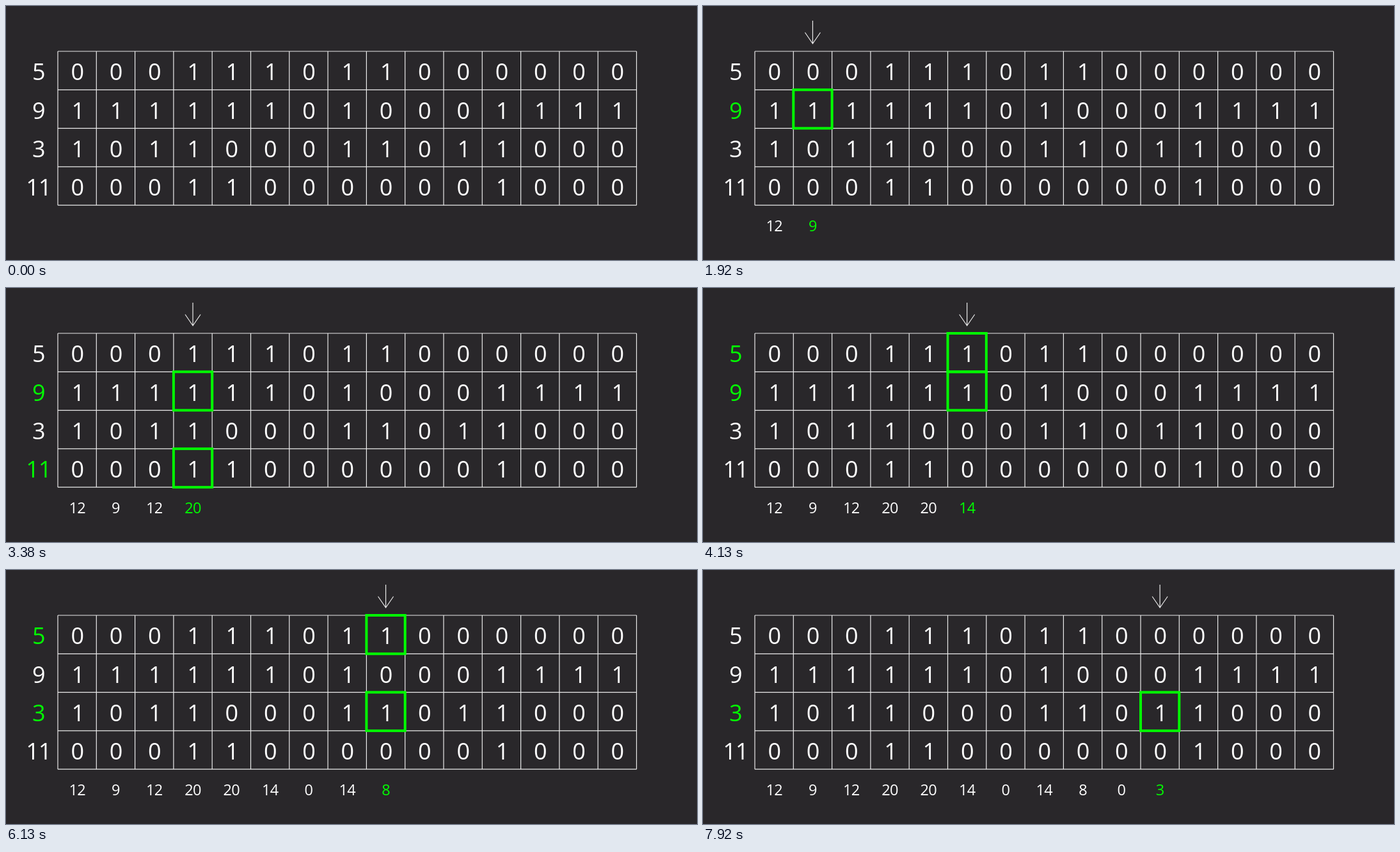
These frames come from a looping animation (1080 px wide and 398 px high, 8 s). An HTML page:

```html
<!DOCTYPE html>
<html lang="en">
<head>
<meta charset="utf-8">
<title>Column sums</title>
<style>
  html, body { margin: 0; width: 100%; height: 100%; overflow: hidden; background: #29272a; }
  svg { display: block; width: 100%; height: 100%; }
  text { font: 36px "Open Sans", "Noto Sans", sans-serif; letter-spacing: -.03em; text-anchor: middle; fill: #fff; }
  .sum { font-size: 23.5px; }
  .line { fill: none; stroke: #ececec; stroke-width: 1.2; }
  .box { fill: none; stroke: #0f0; stroke-width: 4; }
  text.on { fill: #0f0; }
  .off { display: none; }
</style>
</head>
<body>
<svg viewBox="0 0 1080 398"></svg>
<script>
const LOOP = 8000, START = 792, STEP = 2000 / 3;
const LEFT = 81, TOP = 71, CELL = 60.3, COLS = 15;
const weights = [5, 9, 3, 11];
const rows = ['000111011000000', '111111010001111', '101100011011000', '000110000001000'];

const svg = document.querySelector('svg');

function add(tag, attrs, text = '') {
  const el = document.createElementNS('http://www.w3.org/2000/svg', tag);
  for (const name in attrs) el.setAttribute(name, attrs[name]);
  el.textContent = text;
  return svg.appendChild(el);
}

const midX = col => LEFT + CELL * (col + .5);
const baseY = row => TOP + CELL * (row + .5) + 15.2;

// The two heaviest rows set in a column.
const picksAt = col => weights.map((w, r) => r)
  .filter(r => rows[r][col] === '1')
  .sort((a, b) => weights[b] - weights[a])
  .slice(0, 2);

let grid = '';
for (let c = 0; c <= COLS; c++) grid += `M${LEFT + c * CELL} ${TOP}v${CELL * rows.length}`;
for (let r = 0; r <= rows.length; r++) grid += `M${LEFT} ${TOP + r * CELL}h${CELL * COLS}`;
add('path', { d: grid, class: 'line' });

const labels = weights.map((w, r) => add('text', { x: 50.7, y: baseY(r) }, w));
rows.forEach((bits, r) => [...bits].forEach((bit, c) =>
  add('text', { x: midX(c) + (bit === '1' ? 1 : 0), y: baseY(r) }, bit)));

const picks = Array.from({ length: COLS }, (_, c) => picksAt(c));
const sums = picks.map((list, c) => add('text', { x: midX(c), y: 352.5, class: 'sum off' },
  list.reduce((total, r) => total + weights[r], 0)));

const boxes = rows.map((_, r) =>
  add('rect', { y: TOP + r * CELL, width: CELL, height: CELL, class: 'box' }));
const arrow = add('path', { d: 'M0 23V59M-12 41.5L0 59L12 41.5', class: 'line' });

let shown = null;

function show(col) {
  const active = picks[col] || [];
  arrow.classList.toggle('off', col < 0);
  arrow.setAttribute('transform', `translate(${midX(col)})`);
  boxes.forEach((box, r) => {
    box.setAttribute('x', LEFT + col * CELL);
    box.classList.toggle('off', !active.includes(r));
    labels[r].classList.toggle('on', active.includes(r));
  });
  sums.forEach((sum, c) => {
    sum.classList.toggle('off', c > col);
    sum.classList.toggle('on', c === col);
  });
}

function tick() {
  const time = performance.now() % LOOP;
  const col = Math.max(-1, Math.floor((time - START) / STEP));
  if (col !== shown) show(shown = col);
  requestAnimationFrame(tick);
}
tick();
</script>
</body>
</html>
```
